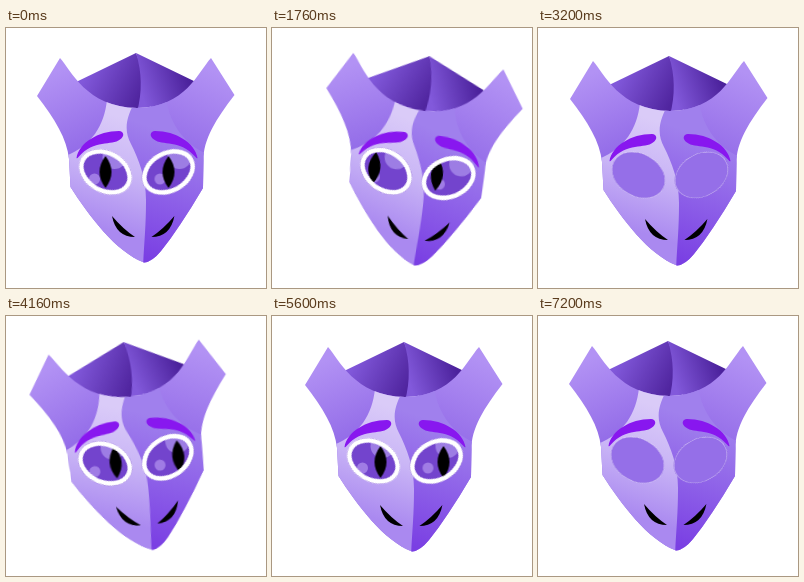
These frames come from a looping animation (260 by 260 pixels, 7360 ms). An HTML page:

```html
<!DOCTYPE html>
<html lang="en">
<head>
<meta charset="utf-8">
<title>Purple mask</title>
<style>
html, body { margin: 0; width: 100%; height: 100%; overflow: hidden; background: #fff; }
svg { display: block; width: 100vw; height: 100vh; }

.head, .pupil, .brows, .lid { animation: 7360ms step-end infinite; }
.head { animation-name: sway; transform-origin: 130px 130px; }
.pupil { animation-name: glance; }
.brows { animation-name: lift; }
.lid { animation-name: blink; }

/* One tick is 160 ms, 1/46 of the loop */
@keyframes sway {
  0% { transform: translate(0, 0) rotate(0deg); }
  2.173% { transform: translate(0, 0) rotate(0deg); animation-timing-function: steps(3, start); }
  8.695% { transform: translate(0, 3px) rotate(0deg); }
  10.869% { transform: translate(0, 3px) rotate(0deg); animation-timing-function: steps(2, start); }
  15.217% { transform: translate(2px, 3px) rotate(0deg); animation-timing-function: steps(5, start); }
  26.086% { transform: translate(15.9px, 2.6px) rotate(6.3deg); }
  30.434% { transform: translate(15.9px, 2.6px) rotate(6.3deg); animation-timing-function: steps(3, start); }
  36.956% { transform: translate(1px, 3px) rotate(0deg); }
  47.826% { transform: translate(1px, 3px) rotate(0deg); animation-timing-function: steps(2, start); }
  52.173% { transform: translate(-1.7px, 2.4px) rotate(-3deg); }
  54.347% { transform: translate(-1.7px, 2.4px) rotate(-3deg); animation-timing-function: steps(2, start); }
  58.695% { transform: translate(-1.9px, .6px) rotate(-5.7deg); }
  63.043% { transform: translate(-1.9px, .6px) rotate(-5.7deg); animation-timing-function: steps(2, start); }
  67.391% { transform: translate(3.5px, 1px) rotate(1deg); }
  71.739% { transform: translate(-1.5px, 1px) rotate(-1deg); }
  76.086% { transform: translate(2px, 1px) rotate(0deg); }
  78.26% { transform: translate(1px, .5px) rotate(0deg); }
  82.608% { transform: translate(1px, .5px) rotate(0deg); animation-timing-function: steps(2, start); }
  86.956% { transform: translate(11px, .8px) rotate(6deg); animation-timing-function: steps(3, start); }
  93.478%, 100% { transform: translate(0, 0) rotate(0deg); }
}
@keyframes glance {
  0% { transform: translate(0, 0); }
  15.217% { transform: translate(0, 0); animation-timing-function: steps(5, start); }
  26.086% { transform: translate(-12px, -2px); }
  30.434% { transform: translate(-12px, -2px); animation-timing-function: steps(3, start); }
  36.956% { transform: translate(0, 0); }
  47.826% { transform: translate(0, 0); animation-timing-function: steps(2, start); }
  52.173% { transform: translate(5.5px, 0); }
  54.347% { transform: translate(5.5px, 0); animation-timing-function: steps(2, start); }
  58.695% { transform: translate(10.5px, 0); }
  63.043% { transform: translate(10.5px, 0); animation-timing-function: steps(2, start); }
  67.391% { transform: translate(0, 0); }
  71.739% { transform: translate(11px, 0); }
  76.086% { transform: translate(7px, 1px); }
  78.26% { transform: translate(0, 0); }
  82.608% { transform: translate(0, 0); animation-timing-function: steps(2, start); }
  86.956% { transform: translate(-11px, -2px); animation-timing-function: steps(3, start); }
  93.478%, 100% { transform: translate(0, 0); }
}
@keyframes lift {
  0% { transform: translateY(0); }
  26.086% { transform: translateY(-10px); }
  30.434% { transform: translateY(-10px); animation-timing-function: steps(3, start); }
  36.956%, 100% { transform: translateY(0); }
}
@keyframes blink {
  0% { transform: translateY(-48px); }
  39.13% { transform: translateY(-48px); animation-timing-function: steps(3, start); }
  45.652% { transform: translateY(0); }
  47.826% { transform: translateY(0); animation-timing-function: steps(2, start); }
  52.173% { transform: translateY(-48px); }
  93.478% { transform: translateY(-48px); animation-timing-function: steps(3, start); }
  100% { transform: translateY(0); }
}
</style>
</head>
<body>
<svg viewBox="0 0 260 260">
  <defs>
    <linearGradient id="crownL" gradientUnits="userSpaceOnUse" x1="82" y1="42" x2="134" y2="68">
      <stop stop-color="#8158da"/><stop offset="1" stop-color="#50259f"/>
    </linearGradient>
    <linearGradient id="crownR" gradientUnits="userSpaceOnUse" x1="134" y1="62" x2="180" y2="46">
      <stop stop-color="#8259db"/><stop offset="1" stop-color="#4c229c"/>
    </linearGradient>
    <linearGradient id="hornL" gradientUnits="userSpaceOnUse" x1="48" y1="44" x2="82" y2="120">
      <stop stop-color="#b292f4"/><stop offset="1" stop-color="#936ce8"/>
    </linearGradient>
    <linearGradient id="hornR" gradientUnits="userSpaceOnUse" x1="212" y1="44" x2="178" y2="120">
      <stop stop-color="#b292f4"/><stop offset="1" stop-color="#966fe9"/>
    </linearGradient>
    <linearGradient id="cheekL" gradientUnits="userSpaceOnUse" x1="118" y1="90" x2="84" y2="196">
      <stop stop-color="#dacbf8"/><stop offset=".45" stop-color="#cab6f6"/><stop offset="1" stop-color="#aa89f0"/>
    </linearGradient>
    <linearGradient id="cheekR" gradientUnits="userSpaceOnUse" x1="182" y1="112" x2="140" y2="230">
      <stop stop-color="#a080ed"/><stop offset="1" stop-color="#7a3fe3"/>
    </linearGradient>
    <clipPath id="face">
      <path d="M54 30C65 42 80 79 131 80C180 79 192 44 205 30L228.500 67C210 91 197 112 197.500 132L197 160C181 187 167 208 155 223Q146 234 138 234.500C110 224 83 188 64.500 159L63 131C61 111 49 91 31 68Z"/>
    </clipPath>
    <clipPath id="eyeL"><ellipse rx="28" ry="21" transform="rotate(29)"/></clipPath>
    <clipPath id="eyeR"><ellipse rx="28" ry="21" transform="rotate(-29)"/></clipPath>
    <path id="slit" d="M0-16Q12 0 0 16Q-12 0 0-16Z"/>
    <path id="brow" d="M70.500 130C73 115 92 103 113 103C118 103.500 119 108 114 111.500C106 118 88 111 72.500 129Q71 131 70.500 130Z" fill="#8817ef"/>
    <path id="smile" d="M106 188Q110 209 129 209Q117 201 106 188Z"/>
  </defs>

  <g class="head">
    <path d="M130 25L68 55L75 76L131 84H140V50Z" fill="url(#crownL)"/>
    <path d="M130 25L192 55L185 76L131 84Q139 54 130 25Z" fill="url(#crownR)"/>

    <g clip-path="url(#face)">
      <path d="M20 20H131V240H20Z" fill="url(#hornL)"/>
      <path d="M130 20H240V240H130Z" fill="url(#hornR)"/>
      <path d="M101 72C98 98 86 117 60 128V240H145V70Z" fill="url(#cheekL)"/>
      <path d="M131 70C119 90 118 103 125 116C133 132 140 150 140 172C140 200 138 215 137 240H205V128C180 118 164 98 160 70Z" fill="url(#cheekR)"/>
    </g>

    <use href="#smile"/>
    <use href="#smile" transform="translate(274.400) scale(-1 1)"/>

    <g transform="translate(99.500 144)">
      <g clip-path="url(#eyeL)">
        <rect x="-30" y="-26" width="60" height="52" fill="#7344cd"/>
        <circle cx="9" cy="-15" r="12" fill="#9d7de4"/>
        <circle cx="-11" cy="7" r="5.500" fill="#a07ce5"/>
        <use class="pupil" href="#slit"/>
      </g>
      <ellipse rx="25.700" ry="18.700" transform="rotate(29)" fill="none" stroke="#fff" stroke-width="4.600"/>
      <g clip-path="url(#eyeL)"><rect class="lid" x="-30" y="-24" width="60" height="48" fill="#956fe8"/></g>
    </g>
    <g transform="translate(162.500 144)">
      <g clip-path="url(#eyeR)">
        <rect x="-30" y="-26" width="60" height="52" fill="#7344cd"/>
        <circle cx="11" cy="-15" r="12" fill="#9d7de4"/>
        <circle cx="-8.500" cy="7" r="5.500" fill="#a07ce5"/>
        <use class="pupil" href="#slit"/>
      </g>
      <ellipse rx="25.700" ry="18.700" transform="rotate(-29)" fill="none" stroke="#fff" stroke-width="4.600"/>
      <g clip-path="url(#eyeR)"><rect class="lid" x="-30" y="-24" width="60" height="48" fill="#956fe8"/></g>
    </g>

    <g class="brows">
      <use href="#brow"/>
      <use href="#brow" transform="translate(262) scale(-1 1)"/>
    </g>
  </g>
</svg>
</body>
</html>
```
